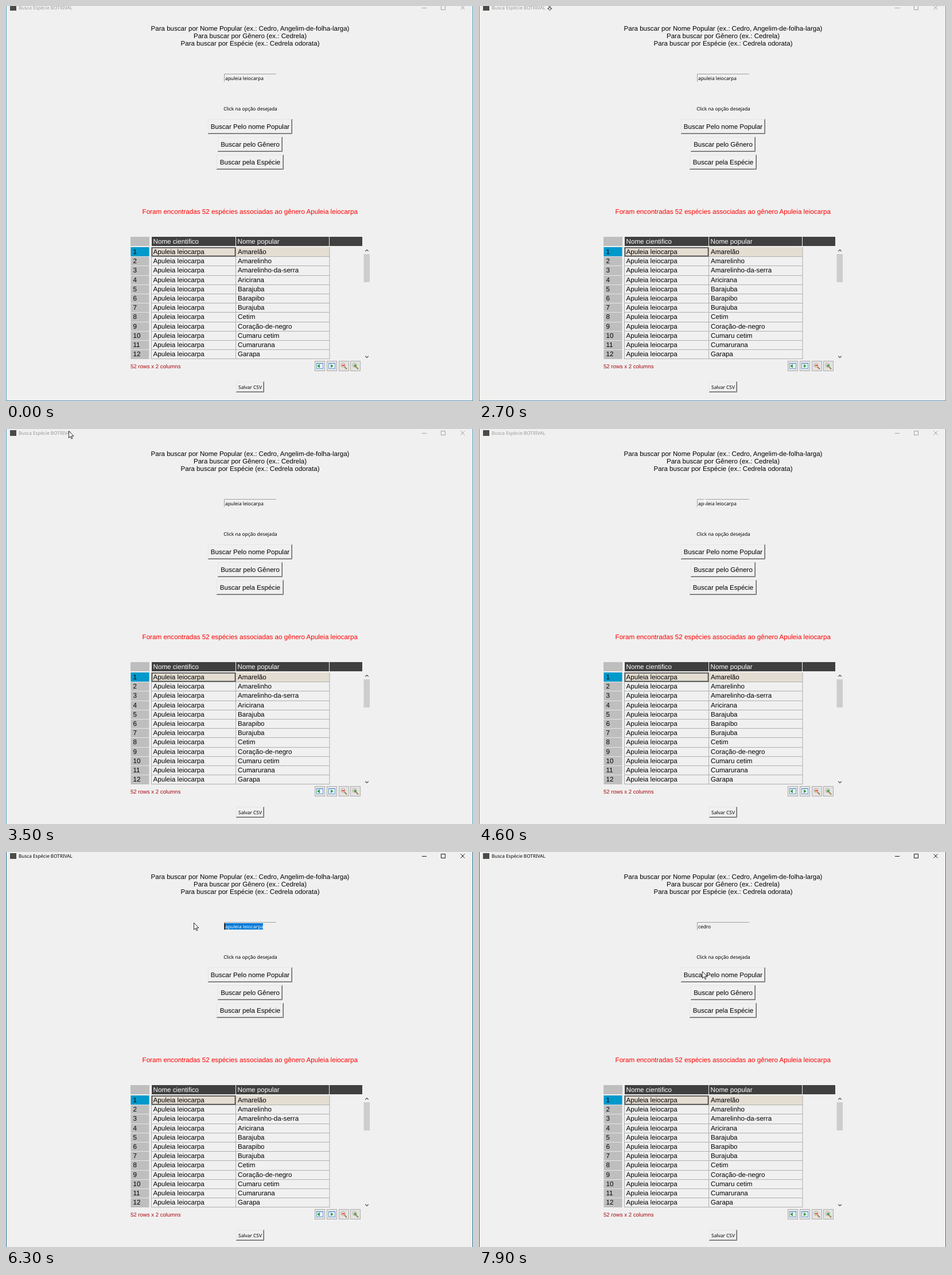
Recreate the animation shown at these times as an HTML page. Size 814 by 688 pixels, loop 8000 ms.

```html
<!DOCTYPE html>
<html lang="pt-BR">
<head>
<meta charset="utf-8">
<title>Busca Espécie</title>
<style>
  html, body { margin: 0; width: 100%; height: 100%; overflow: hidden; background: #f0f0f0; }
  svg { display: block; width: 814px; height: 688px; }
  text { font: 11.55px "Liberation Sans", Arial, sans-serif; text-rendering: geometricPrecision; white-space: pre; }
  .mid { text-anchor: middle; }
  .ui { font: 8.35px "Noto Sans", sans-serif; }
  .cell { font-size: 11.65px; }
  #bar { fill: #999; stroke: #999; }
  #bar text { stroke: none; font-size: 8.2px; }
  #bar path { fill: none; }
  #edge { fill: none; stroke: #5b9dbb; }
  .active #bar { fill: #000; stroke: #000; }
  .active #edge { stroke: #2b6f94; }
</style>
</head>
<body>
<svg id="stage" viewBox="0 0 814 688">
  <defs>
    <rect id="tool" x=".5" y=".5" width="17" height="17" fill="#e3e3e3" stroke="#adadad"/>
    <g id="pane">
      <use href="#tool"/>
      <rect x="3.5" y="4.5" width="11" height="9" fill="#e6f1fb" stroke="#6a9fd4"/>
      <path d="M3 4.5h12" stroke="#3f7fc4"/>
    </g>
    <g id="lens">
      <use href="#tool"/>
      <path d="M10 10.5l4 4" stroke="#a87a3c" stroke-width="1.8"/>
      <circle cx="7.5" cy="7.5" r="3.6" fill="#e8e4dc" stroke="#a9a59c" stroke-width=".9"/>
    </g>
  </defs>

  <g id="win">
    <g id="bar">
      <rect x="7" y="-2" width="11" height="10" fill="#4a4a46" stroke="none"/>
      <text class="ui" x="22" y="6.2">Busca Espécie BOTRIVAL</text>
      <path d="M725 3.5h8M758.5-.5h7v7h-7zM792.5-.5l7 7m0-7l-7 7" stroke-width=".9"/>
    </g>

    <g class="mid">
      <text x="425.5" y="43">Para buscar por Nome Popular (ex.: Cedro, Angelim-de-folha-larga)</text>
      <text x="425.5" y="56">Para buscar por Gênero (ex.: Cedrela)</text>
      <text x="425.5" y="69">Para buscar por Espécie (ex.: Cedrela odorata)</text>
      <text class="ui" x="426" y="182">Click na opção desejada</text>
      <text class="cell" x="425.2" y="362" fill="#f00">Foram encontradas 52 espécies associadas ao gênero Apuleia leiocarpa</text>
    </g>

    <path d="M380.5 132v-13.5H471" fill="none" stroke="#a0a0a0"/>
    <rect id="sel" x="381" y="120" width="67" height="11" fill="#0078d7"/>
    <text id="entry" class="ui" x="382" y="129"></text>
    <path id="caret" d="M0 120v11" stroke="#000" stroke-width="1.4"/>

    <g id="buttons"></g>
    <g id="table"></g>

    <path d="M626.3 427.3l2.7-2.7 2.7 2.7M626.3 609.7l2.7 2.7 2.7-2.7" fill="none" stroke="#505050" stroke-width="1.3"/>
    <rect x="623.5" y="432" width="10.5" height="49" fill="#cdcdcd"/>

    <text x="217" y="630.6" style="font-size:9.6px" fill="#a80810">52 rows x 2 columns</text>
    <g transform="translate(538 618)">
      <use href="#pane"/>
      <path d="M5 9l3-2.5v5zM8.5 6v6" fill="#2f9a35" stroke="#2f9a35" stroke-width=".8"/>
    </g>
    <g transform="translate(559 618)">
      <use href="#pane"/>
      <path d="M7.5 6.5l3.5 2.5-3.5 2.5z" fill="#2f9a35" stroke="#2f9a35" stroke-width=".8"/>
    </g>
    <g transform="translate(580 618)">
      <use href="#lens"/>
      <path d="M5.5 8h5" stroke="#e8503c" stroke-width="2.2"/>
    </g>
    <g transform="translate(600 618)">
      <use href="#lens"/>
      <path d="M6 8.5h5m-2.5-2.5v5" stroke="#4d9b3a" stroke-width="1.8"/>
    </g>
  </g>

  <path id="edge" d="M.5 0v688M813.5 0v688"/>
  <path id="base" d="M0 687.5h814" stroke="#5b9dbb"/>

  <g id="arrow">
    <path d="M0 0v12l2.8-2.6 1.9 4.2 1.7-.7-1.9-4.1h4z" fill="#fff" stroke="#111" stroke-width=".9"/>
  </g>
  <g id="resize">
    <path d="M-1-6h2v7h2.6L0 4.8-3.6 1H-1z" fill="#fff" stroke="#111" stroke-width=".9"/>
  </g>
  <g id="beam">
    <path d="M-2-5.5h4M0-5.5v11M-2 5.5h4" fill="none" stroke="#fff" stroke-width="2"/>
  </g>
</svg>

<script>
const $ = id => document.getElementById(id);
const rect = (x, y, w, h, fill, extra = '') =>
  `<rect x="${x}" y="${y}" width="${w}" height="${h}" fill="${fill}" ${extra}/>`;
const line = (d, color) => `<path d="${d}" fill="none" stroke="${color}"/>`;
const cell = (x, y, s, fill = '#000') => `<text class="cell" x="${x}" y="${y}" fill="${fill}">${s}</text>`;

function button(x, y, w, h, label, cls = '') {
  const r = x + w - .5, b = y + h - .5;
  return line(`M${x + .5} ${b}V${y + .5}H${r}`, '#e6e6e6') +
    line(`M${x + 1} ${b - 1}H${r - 1}V${y + 1}`, '#a0a0a0') +
    line(`M${x} ${b}H${r}V${y}`, '#696969') +
    `<text class="mid ${cls}" x="${x + w / 2}" y="${y + h / 2 + (cls ? 3 : 4)}">${label}</text>`;
}

$('buttons').innerHTML =
  button(352, 197, 147, 26, 'Buscar Pelo nome Popular') +
  button(369, 228, 113, 26, 'Buscar pelo Gênero') +
  button(367, 259, 117, 26, 'Buscar pela Espécie') +
  button(401, 654, 49, 19, 'Salvar CSV', 'ui');

function table() {
  const names = ['Amarelão', 'Amarelinho', 'Amarelinho-da-serra', 'Aricirana', 'Barajuba', 'Barapibo',
    'Burajuba', 'Cetim', 'Coração-de-negro', 'Cumaru cetim', 'Cumarurana', 'Garapa'];
  const top = 420, step = 16.2, end = 615;
  let s = rect(217, 402, 33, 16, '#bebebe') + rect(254, 402, 367, 16, '#404040') +
    line('M400.5 402v16M563.5 402v16', '#f0f0f0') +
    cell(256.5, 414, 'Nome cientifico', '#fff') + cell(403.5, 414, 'Nome popular', '#fff') +
    rect(217.5, top, 32, end - top, '#bebebe') +
    rect(217.5, top, 32, step, '#0099cc') + rect(254, top, 310, step, '#e4ddd2');
  names.forEach((name, i) => {
    const y = top + i * step, rule = Math.round(y) + .5, base = y + 12;
    if (i) s += line(`M217 ${rule}h33`, '#e6e6e6') + line(`M253 ${rule}H564`, '#abb1ad');
    s += cell(221.5, base, i + 1) + cell(256.5, base, 'Apuleia leiocarpa') + cell(404, base, name);
  });
  return s + line(`M253.5 ${top}V${end}M400.5 ${top}V${end}M564 ${top}V${end}M253 ${end - .5}H564`, '#abb1ad') +
    rect(254.5, 421, 145, 14.5, 'none', 'stroke="#404040" stroke-width="1.5"');
}
$('table').innerHTML = table();

// start, end, pointer, from x, y, to x, y
const moves = [
  [0, 0, '', 0, 0],
  [700, 1500, 'arrow', 560, 616, 129.5, -3],
  [1600, 1600, 'arrow', 129.5, -4],
  [1800, 1800, 'arrow', 129.5, -4.6],
  [2000, 2000, 'arrow', 129.5, -4],
  [2200, 2300, 'resize', 133, 3, 123.3, 3],
  [2800, 2800, 'resize', 123.3, 2],
  [3500, 4000, 'arrow', 109.5, 3.5, 114, 7],
  [4200, 4500, 'arrow', 150, 20, 350, 110],
  [4600, 5000, 'beam', 393.8, 129, 438.5, 128],
  [5100, 5100, 'beam', 457.5, 128],
  [5500, 5500, 'beam', 375, 128],
  [5800, 5900, 'beam', 360, 128, 340, 129],
  [6000, 6000, 'arrow', 327.5, 123.3],
  [6400, 6400, '', 0, 0],
  [7500, 7900, 'arrow', 326, 124, 389.3, 208]
];
const keys = [6400, 6500, 6600, 6800, 6900];
const show = (id, on) => $(id).style.display = on ? '' : 'none';
const place = (id, x, y) => $(id).setAttribute('transform', `translate(${x} ${y})`);

function draw(t) {
  const [a, b, kind, x0, y0, x1 = x0, y1 = y0] = moves.findLast(m => m[0] <= t);
  const p = b > a ? Math.min(1, (t - a) / (b - a)) : 0, e = p * p * (3 - 2 * p);
  for (const id of ['arrow', 'resize', 'beam']) show(id, id === kind);
  if (kind) place(kind, x0 + (x1 - x0) * e, y0 + (y1 - y0) * e);

  place('win', 0, t < 2800 ? 0 : t < 2900 ? 3 : 4);
  show('base', t < 2800);
  $('stage').classList.toggle('active', t >= 5300);

  const typed = keys.filter(k => k <= t).length, selected = t >= 5500 && !typed;
  const entry = $('entry');
  entry.textContent = typed ? 'cedro'.slice(0, typed) : 'apuleia leiocarpa';
  entry.setAttribute('fill', selected ? '#fff' : '#000');
  show('sel', selected);
  show('caret', t >= 6000 && t < 7200 || t >= 7500 && t < 7800);
  place('caret', typed ? 382.2 + entry.getComputedTextLength() : 381.3, 0);
}

const start = performance.now();
function tick() {
  draw(Math.floor((performance.now() - start) % 8000 / 100) * 100);
  requestAnimationFrame(tick);
}
tick();
</script>
</body>
</html>
```
